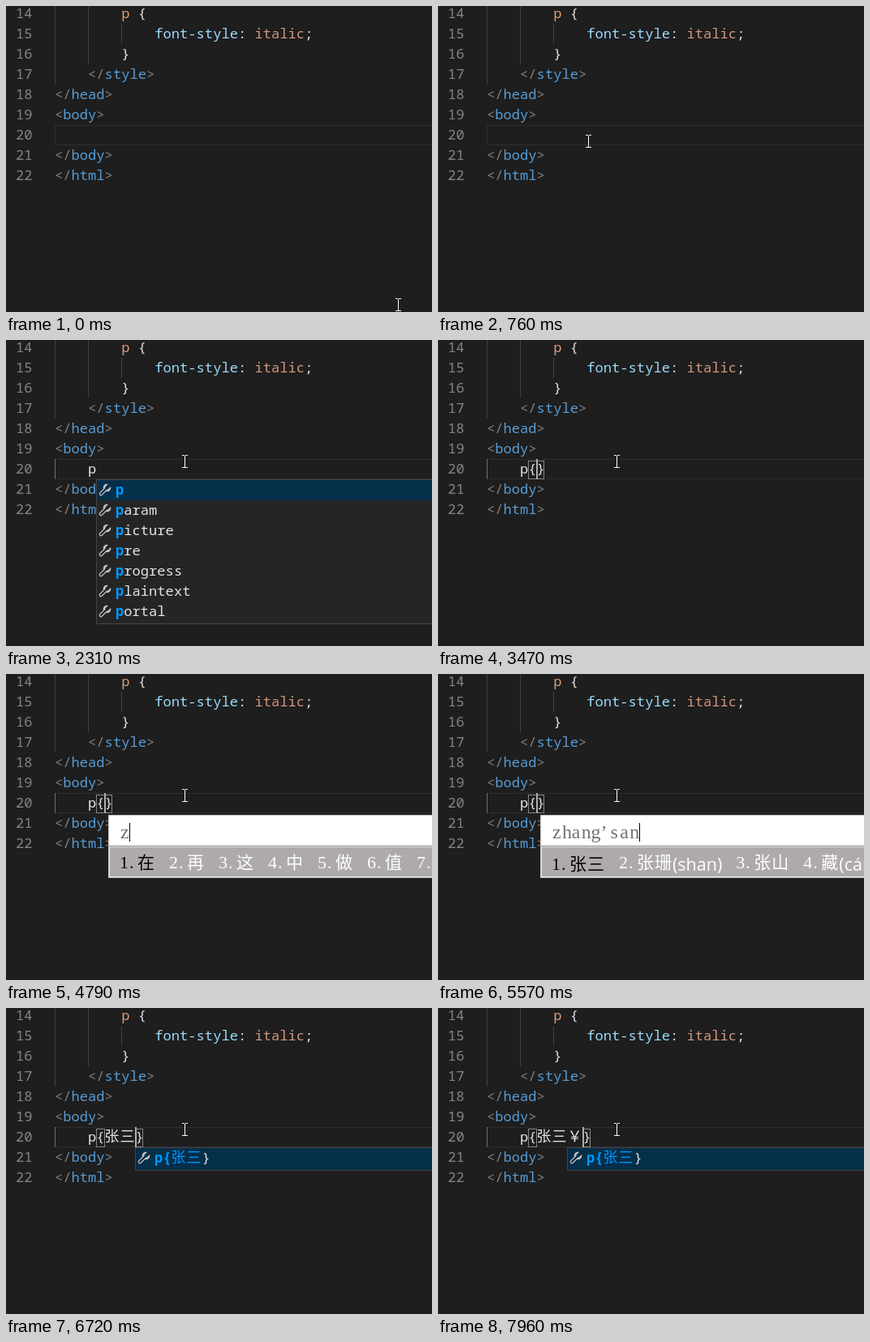
An HTML page with a canvas that plays this animation: 525x378 px, repeating every 8000 ms.

```html
<!DOCTYPE html>
<html lang="en">
<head>
<meta charset="utf-8">
<title>Editor typing</title>
<style>
html, body { margin: 0; width: 100%; height: 100%; overflow: hidden; background: #1e1e1e; }
canvas { display: block; }
</style>
</head>
<body>
<canvas id="stage" width="525" height="378"></canvas>
<script>
const ctx = document.getElementById('stage').getContext('2d');
const LOOP = 8000, LEFT = 60, COL = 10.27, WIDE = 19, ROW = 25;
const CODE = '17.1px "Noto Sans Mono", monospace';
const HAN = '"Noto Sans CJK SC", "Noto Sans CJK", sans-serif';
const GRAY = '#808080', BLUE = '#569cd6', TEXT = '#e4e4e4', HIT = '#0097fb', TAN = '#d89d76';

const rowTop = n => (n - 14) * ROW - 3;

function rect(x, y, w, h, color) {
  ctx.fillStyle = color;
  ctx.fillRect(x, y, w, h);
}

function frame(x, y, w, h, color) {
  ctx.strokeStyle = color;
  ctx.lineWidth = 1;
  ctx.strokeRect(x + .5, y + .5, w - 1, h - 1);
}

// Writes text on the editor grid and returns the x after it.
function put(text, x, y, color, weight = 400) {
  ctx.fillStyle = color;
  for (const ch of text) {
    const wide = ch > '\u2000';
    ctx.font = wide ? `300 18px ${HAN}` : `${weight} ${CODE}`;
    ctx.fillText(ch, x, y);
    x += wide ? WIDE : COL;
  }
  return x;
}

function line(n, col, ...parts) {
  let x = LEFT + col * COL;
  for (const [text, color, weight] of parts) x = put(text, x, rowTop(n) + 18, color, weight);
}

const tag = (open, name) => [[open, GRAY], [name, BLUE], ['>', GRAY]];

function page() {
  rect(0, 0, 525, 378, '#1e1e1e');
  rect(60, 0, 1, 97, '#404040');
  rect(101, 0, 1, 72, '#404040');
  rect(142, 22, 1, 25, '#404040');
  for (let n = 14; n <= 22; n++) put(String(n), 12, rowTop(n) + 18, '#858585');
  line(14, 8, ['p ', TAN, 500], ['{', TEXT, 500]);
  line(15, 12, ['font-style', '#9cdcfe', 500], [': ', TEXT, 500], ['italic', '#d3967c', 500], [';', TEXT, 500]);
  line(16, 8, ['}', TEXT, 500]);
  line(17, 4, ...tag('</', 'style'));
  line(18, 0, ...tag('</', 'head'));
  line(19, 0, ...tag('<', 'body'));
  line(21, 0, ...tag('</', 'body'));
  line(22, 0, ...tag('</', 'html'));
  frame(60, 147, 480, 25, '#2d2d2d');
}

const blinks = [800, 1310, 1770, 2310, 2460, 2920, 3470, 3930, 4480, 4940, 5420, 6260, 6720, 7270, 7730];

function typedLine(t) {
  let x = 100;
  if (t >= 1850) {
    rect(60, 147, 1, 25, '#707070');
    x = put('p', 101, 165, TEXT);
  }
  if (t >= 2460) {
    frame(111, 149, 11, 23, '#888');
    x = put('{', x, 165, TEXT);
    x = put(t >= 7960 ? '张三￥' : t >= 5720 ? '张三' : '', x, 165, TEXT);
    frame(Math.floor(x), 149, 10, 23, '#888');
    put('}', x, 165, TEXT);
  }
  if (blinks.filter(b => t >= b).length % 2) rect(Math.floor(x), 147, 2, 25, '#aeafad');
}

function stroke(x1, y1, x2, y2, width, color) {
  ctx.strokeStyle = color;
  ctx.lineWidth = width;
  ctx.beginPath();
  ctx.moveTo(x1, y1);
  ctx.lineTo(x2, y2);
  ctx.stroke();
}

function wrench(x, y, back) {
  ctx.lineCap = 'round';
  stroke(x + 3, y + 13, x + 9, y + 7, 4.6, '#c5c5c5');
  ctx.fillStyle = '#c5c5c5';
  ctx.beginPath();
  ctx.arc(x + 10.5, y + 5.5, 4.8, 0, 7);
  ctx.fill();
  stroke(x + 3, y + 13, x + 9.5, y + 6.5, 2.4, back);
  stroke(x + 10.5, y + 5.5, x + 15, y + 1, 4.4, back);
  ctx.lineCap = 'butt';
}

// Each item is [matched part, rest].
function suggest(x, items) {
  const h = items.length * ROW + 4;
  rect(x, 172, 440, h, '#252526');
  items.forEach(([hit, rest], i) => {
    const y = 173 + i * ROW, back = i ? '#252526' : '#062f4a';
    rect(x, y, 440, ROW + 2, back);
    wrench(x + 3, y + 4, back);
    put(rest, put(hit, x + 24, y + 18, HIT, 600), y + 18, TEXT);
  });
  frame(x, 172, 440, h, '#454545');
}

// Start time, typed letters, candidates; Latin notes follow in brackets.
const input = [
  [4790, 'z', '在 再 这 中 做 值 字'],
  [5010, 'zh', '在 再 这 中 做 值 字'],
  [5090, 'zh', '这 中 着 值 只 张 知'],
  [5270, 'zhang', '张 章 长 掌 涨 帐 丈'],
  [5420, 'zhang’s', '张三 张帅 张姝 章'],
  [5570, 'zhang’san', '张三 张珊(shan) 张山 藏(cáng)']
];

function inputBox(t) {
  const [, letters, list] = input.filter(s => t >= s[0]).pop();
  rect(126, 174, 410, 78, '#e6e6e6');
  frame(126, 174, 410, 78, '#c4c4c4');
  rect(127, 175, 410, 37, '#fff');
  rect(127, 212, 410, 1, '#8a8a8a');
  rect(128, 214, 410, 36, '#aeaaab');

  ctx.font = '24px "Liberation Serif", serif';
  ctx.fillStyle = '#747474';
  [...letters].forEach((ch, i) => ctx.fillText(ch, 141 + i * 11.9, 203));
  rect(Math.floor(141 + letters.length * 11.9), 184, 1, 23, '#000');

  let x = 140;
  list.split(' ').forEach((word, i) => {
    const [han, note] = word.split('(');
    const y = i || han.length < 2 ? 240 : 242;
    ctx.fillStyle = i ? '#fff' : '#000';
    ctx.font = '22px "Liberation Serif", serif';
    ctx.fillText(i + 1, x, y);
    ctx.fillText('.', x + 12, y);
    x += 22;
    ctx.font = `300 21px ${HAN}`;
    for (const ch of han) {
      ctx.fillText(ch, x, y);
      x += 22;
    }
    if (note) {
      ctx.font = '21.5px "Open Sans", sans-serif';
      ctx.fillText('(' + note, x, 243);
      x += ctx.measureText('(' + note).width;
    }
    x += 17;
  });
}

function pointer(t) {
  let x = 220, y = 150;
  if (t < 930) {
    const step = t < 70 ? 0 : Math.min(10, Math.floor((t - 70) / 78) + 1) / 10;
    const p = step * step * (3 - 2 * step);
    x = Math.round(483 - 307 * p);
    y = Math.round(369 - 208 * p);
  }
  rect(x, y - 7, 1, 15, '#fff');
  for (const edge of [y - 8, y + 7]) {
    rect(x - 3, edge, 3, 1, '#fff');
    rect(x + 1, edge, 3, 1, '#fff');
  }
}

const tags = ['', 'aram', 'icture', 're', 'rogress', 'laintext', 'ortal'].map(rest => ['p', rest]);

function draw(now) {
  const t = now % LOOP;
  page();
  typedLine(t);
  if (t >= 1850 && t < 2460) suggest(111, tags);
  if (t >= 4790 && t < 5720) inputBox(t);
  if (t >= 5800) suggest(159, [['p{张三', '}']]);
  pointer(t);
  requestAnimationFrame(draw);
}
requestAnimationFrame(draw);
</script>
</body>
</html>
```
